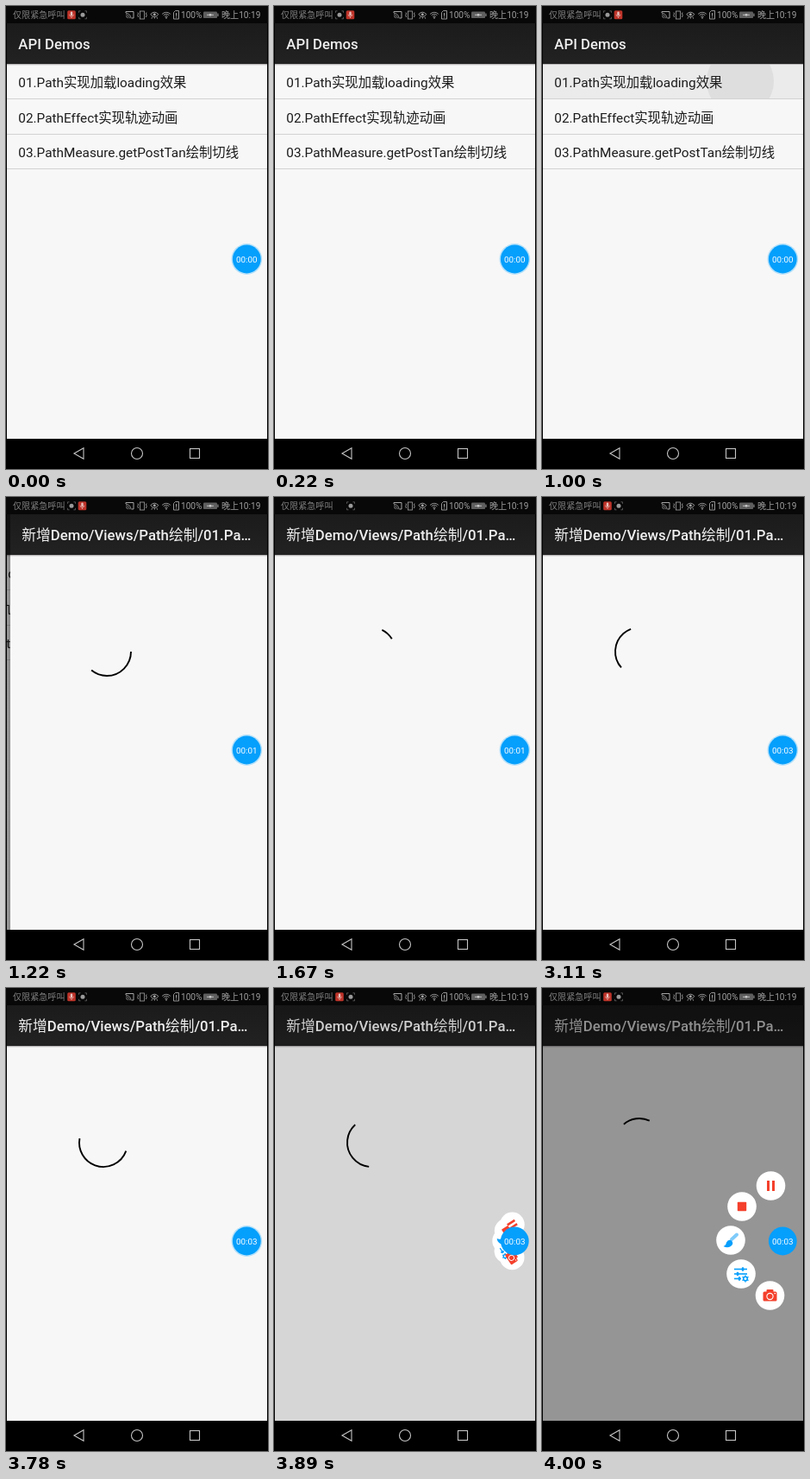
Recreate the animation shown at these times as an HTML page with a canvas. Size 304 px wide and 536 px high, loop 4110 ms.

```html
<!DOCTYPE html>
<html lang="zh-CN">
<head>
<meta charset="utf-8">
<title>Path loading demo</title>
<style>
  html, body { margin: 0; width: 100%; height: 100%; overflow: hidden; background: #000; }
  canvas { display: block; width: 304px; height: 536px; }
</style>
</head>
<body>
<canvas id="stage"></canvas>
<script>
const W = 304, H = 536, LOOP = 4110, STEP = LOOP / 37;
const BAR_TOP = 20, BAR_BOTTOM = 67, NAV_TOP = 501;
const FONT = 'Roboto, "Noto Sans CJK SC", "Noto Sans CJK", sans-serif';
const BLUE = '#059ffc', RED = '#f4402c', TAU = Math.PI * 2;
const ROWS = ['01.Path实现加载loading效果', '02.PathEffect实现轨迹动画', '03.PathMeasure.getPostTan绘制切线'];
const ROW_H = 40.6;

// Loader progress in turns, by time.
const TURNS = [[1000, 0.09], [1220, 0.36], [2330, 1.72], [3780, 3.528], [3890, 3.633], [4000, 3.819]];

const canvas = document.getElementById('stage');
const dpr = window.devicePixelRatio || 1;
canvas.width = W * dpr;
canvas.height = H * dpr;
const c = canvas.getContext('2d');

function text(str, x, y, size, color, weight = 400, align = 'left') {
  c.font = `${weight} ${size}px ${FONT}`;
  c.fillStyle = color;
  c.textAlign = align;
  c.fillText(str, x, y);
}

function rect(x, y, w, h, color) {
  c.fillStyle = color;
  c.fillRect(x, y, w, h);
}

function disc(x, y, r, color) {
  c.fillStyle = color;
  c.beginPath();
  c.arc(x, y, r, 0, TAU);
  c.fill();
}

function ring(x, y, r, color, width = 1, from = 0, to = TAU) {
  c.strokeStyle = color;
  c.lineWidth = width;
  c.beginPath();
  c.arc(x, y, r, from, to);
  c.stroke();
}

function line(points, color, width = 1, close = false) {
  c.strokeStyle = color;
  c.lineWidth = width;
  c.beginPath();
  points.forEach(([x, y]) => c.lineTo(x, y));
  if (close) c.closePath();
  c.stroke();
}

function roundRect(x, y, w, h, r, color) {
  c.fillStyle = color;
  c.beginPath();
  c.roundRect(x, y, w, h, r);
  c.fill();
}

function at(x, y, angle, draw) {
  c.save();
  c.translate(x, y);
  c.rotate(angle);
  draw();
  c.restore();
}

function interpolate(keys, t) {
  if (t <= keys[0][0]) return keys[0][1];
  for (let i = 1; i < keys.length; i++) {
    const [t0, v0] = keys[i - 1], [t1, v1] = keys[i];
    if (t <= t1) return v0 + (v1 - v0) * (t - t0) / (t1 - t0);
  }
  return keys[keys.length - 1][1];
}

function micIcon(x) {
  roundRect(x - 4.8, 5.2, 9.6, 10, 1.5, '#bd3329');
  roundRect(x - 1.2, 6.5, 2.4, 4.6, 1.2, '#e8c4c0');
  ring(x, 9.7, 2.4, '#e8c4c0', 0.7, 0, Math.PI);
  line([[x, 12.1], [x, 13.8]], '#e8c4c0', 0.8);
}

function recordIcon(x) {
  disc(x, 10.3, 2.5, '#9a9a9a');
  for (const sx of [-1, 1]) for (const sy of [-1, 1]) {
    line([[x + sx * 4.5, 10.3 + sy * 2.5], [x + sx * 4.5, 10.3 + sy * 4.5], [x + sx * 2.5, 10.3 + sy * 4.5]], '#666', 0.8);
  }
}

function statusIcons() {
  const g = '#a4a4a4';
  // cast
  line([[139, 8], [139, 6.5], [148, 6.5], [148, 14], [145.5, 14]], g);
  for (const r of [2.2, 4.2, 6]) ring(139, 14.2, r, g, 0.8, -Math.PI / 2, 0);
  // vibrate
  c.strokeStyle = g;
  c.strokeRect(155.5, 6, 5, 9);
  for (const s of [-1, 1]) line([[158 + s * 5, 7.5], [158 + s * 4.5, 9], [158 + s * 5.2, 10.5], [158 + s * 4.5, 13]], g, 0.9);
  // eye with lashes
  c.lineWidth = 0.9;
  c.beginPath();
  c.moveTo(167.8, 9.5);
  c.quadraticCurveTo(172.3, 4.8, 176.8, 9.5);
  c.quadraticCurveTo(172.3, 16, 167.8, 9.5);
  c.stroke();
  disc(172.3, 9.7, 1.5, g);
  for (const s of [-1, 0, 1]) line([[172.3 + s * 2.6, 12.6], [172.3 + s * 3.4, 14.8]], g, 0.8);
  // wifi
  for (const r of [2.4, 4.6, 6.7]) ring(186, 14, r, g, 0.9, -Math.PI * 0.76, -Math.PI * 0.24);
  disc(186, 13.7, 0.9, g);
  // sim
  line([[194.5, 7.5], [196.5, 5.5], [200.5, 5.5], [200.5, 15], [194.5, 15]], g, 0.9, true);
  rect(197, 8, 1, 3.6, g);
  rect(197, 12.5, 1, 1, g);
  // battery
  roundRect(229, 6.5, 16, 7.6, 1.2, '#5e5e5e');
  rect(245, 8.6, 1.8, 3.4, '#5e5e5e');
  line([[233, 10.3], [241, 10.3]], '#c8c8c8', 0.9);
  disc(237, 10.3, 1.4, '#c8c8c8');
}

function statusBar(t) {
  rect(0, 0, W, BAR_TOP, '#080808');
  text('仅限紧急呼叫', 8, 14, 10.1, '#808080');
  const swapped = t >= 220 && t < 1330;
  const micOn = t < 110 || swapped || t >= 2890;
  if (micOn) micIcon(swapped ? 88.5 : 76);
  recordIcon(swapped ? 76 : 89);
  statusIcons();
  text('100%', 203, 14, 10.1, '#a0a0a0');
  text('晚上10:19', 250, 14, 10.1, '#a0a0a0');
}

function navBar() {
  const g = '#c4c4c4';
  rect(0, NAV_TOP, W, H - NAV_TOP, '#000');
  line([[79, 518], [90, 511.8], [90, 524.2]], g, 1.1, true);
  ring(152, 518, 6.5, g, 1.1);
  c.strokeRect(213.5, 512.5, 11, 11);
}

function page(title) {
  rect(1, BAR_TOP, W - 2, NAV_TOP - BAR_TOP, '#f7f7f7');
  const bar = c.createLinearGradient(0, BAR_TOP, 0, BAR_BOTTOM);
  bar.addColorStop(0, '#1b1b1b');
  bar.addColorStop(1, '#222');
  rect(1, BAR_TOP, W - 2, BAR_BOTTOM - BAR_TOP, bar);
  rect(1, BAR_BOTTOM, W - 2, 1, '#bab6b8');
  rect(1, BAR_BOTTOM + 1, W - 2, 1, '#e6e4e5');
  text(title, 14.3, 49.8, 16.75, '#f0f0f0', 500);
}

function listPage(pressed) {
  page('API Demos');
  if (pressed) {
    c.save();
    c.beginPath();
    c.rect(1, BAR_BOTTOM + 1, W - 2, ROW_H - 0.5);
    c.clip();
    rect(1, BAR_BOTTOM, W - 2, ROW_H + 1, '#ebebeb');
    disc(230, 87, 39, '#dedede');
    c.restore();
  }
  ROWS.forEach((row, i) => {
    text(row, 14.3, 94 + i * ROW_H, 15.35, '#1c1c1c');
    rect(1, Math.floor(BAR_BOTTOM + (i + 1) * ROW_H), W - 2, 1, '#d2d2d2');
  });
}

function loaderPage(t) {
  page('新增Demo/Views/Path绘制/01.Pa…');
  const stop = interpolate(TURNS, t) % 1;
  const start = stop - (0.5 - Math.abs(stop - 0.5));
  ring(113, 179, 28, '#000', 1.9, start * TAU, stop * TAU);
}

function slide(t, offset) {
  c.save();
  c.beginPath();
  c.rect(1, BAR_TOP, W - 2, NAV_TOP - BAR_TOP);
  c.clip();
  at((offset - W) * 0.49, 0, 0, () => listPage(false));
  rect(0, BAR_TOP, offset + 1, NAV_TOP - BAR_TOP, 'rgba(0,0,0,0.2)');
  const shade = c.createLinearGradient(offset - 14, 0, offset + 1, 0);
  shade.addColorStop(0, 'rgba(0,0,0,0)');
  shade.addColorStop(1, 'rgba(0,0,0,0.3)');
  rect(offset - 14, BAR_TOP, 15, NAV_TOP - BAR_TOP, shade);
  at(offset, 0, 0, () => loaderPage(t));
  c.restore();
}

function pauseIcon() {
  rect(-4.5, -6, 3, 12, RED);
  rect(1.5, -6, 3, 12, RED);
}

function stopIcon() {
  roundRect(-5.2, -5.2, 10.4, 10.4, 0.8, RED);
}

function brushIcon() {
  c.lineCap = 'round';
  line([[1, -1], [7, -6.5]], '#7fcbfa', 4);
  c.lineCap = 'butt';
  c.fillStyle = BLUE;
  c.beginPath();
  c.moveTo(-8.5, 7);
  c.quadraticCurveTo(-5.5, 6, -5, 2.5);
  c.quadraticCurveTo(-3, -1.5, 1, 0.5);
  c.quadraticCurveTo(4, 4, 0, 7);
  c.quadraticCurveTo(-4, 9.5, -8.5, 7);
  c.fill();
}

function slidersIcon() {
  [[-5.5, 7, 2], [0, 7, -4], [5.5, 0, -2]].forEach(([y, end, knob]) => {
    line([[-8, y], [end, y]], BLUE, 1.6);
    roundRect(knob - 1.2, y - 2.3, 2.4, 4.6, 0.8, BLUE);
  });
  ring(5, 5.5, 2.3, BLUE, 1.6);
  for (let i = 0; i < 6; i++) {
    at(5, 5.5, i * TAU / 6, () => rect(-0.7, -4.1, 1.4, 1.4, BLUE));
  }
}

function cameraIcon() {
  roundRect(-8, -4.5, 16, 11, 1.5, RED);
  roundRect(-4, -7, 8, 4, 1, RED);
  ring(0, 1, 3.6, '#fff', 1.1);
  rect(5, -3, 1.6, 1.2, '#fff');
}

const MENU = [
  [-13.5, -64, pauseIcon], [-47, -40, stopIcon], [-60, -1, brushIcon],
  [-48, 38, slidersIcon], [-14.5, 63, cameraIcon]
];

function menu(open) {
  rect(0, BAR_TOP, W, NAV_TOP - BAR_TOP, `rgba(0,0,0,${open ? 0.4 : 0.133})`);
  const [kx, ky, size, turn] = open ? [1, 1, 1, 0] : [0.19, 0.3, 0.85, 1];
  const place = (dx, dy, angle, draw) => at(279 + dx * kx, 293 + dy * ky, angle, () => {
    c.scale(size, size);
    draw();
  });
  MENU.forEach(([dx, dy]) => place(dx, dy, 0, () => disc(0, 0, 16.8, '#fff')));
  MENU.forEach(([dx, dy, icon]) => place(dx, dy, turn, icon));
}

function bubble(t) {
  const seconds = Math.max(0, Math.floor((t - 110) / 1000));
  if (t < 3890) disc(279.3, 293, 17.9, '#b2e0fa');
  disc(279.3, 293, 16.4, BLUE);
  text('00:0' + seconds, 279.2, 296.6, 9.8, '#fff', 400, 'center');
}

function draw(t) {
  c.setTransform(dpr, 0, 0, dpr, 0, 0);
  rect(0, 0, W, H, '#000');
  if (t < 1110) listPage(t >= 1000);
  else if (t < 1330) slide(t, t < 1220 ? 92 : 4);
  else loaderPage(t);
  if (t >= 3890) menu(t >= 4000);
  statusBar(t);
  navBar();
  bubble(t);
}

const stepStart = k => Math.round(k * STEP / 10) * 10;

function stepTime(t) {
  let k = Math.floor((t + 5) / STEP);
  if (stepStart(k) > t) k--;
  return stepStart(k);
}

const origin = performance.now();
function tick() {
  draw(stepTime((performance.now() - origin) % LOOP));
  requestAnimationFrame(tick);
}
tick();
</script>
</body>
</html>
```
